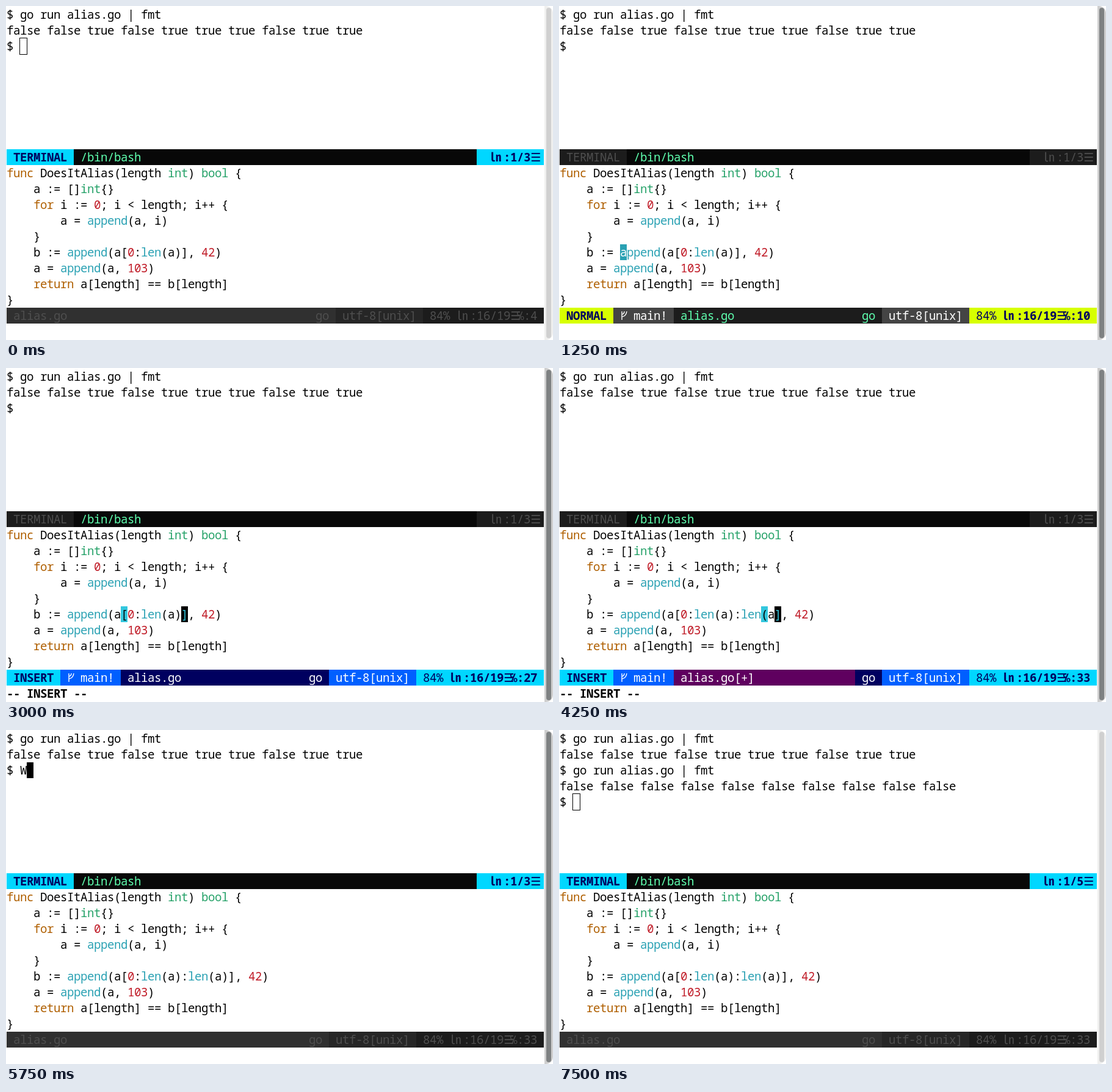
An HTML page with a canvas that plays this animation: 896x548 px, repeating every 7.75 s.

```html
<!DOCTYPE html>
<html lang="en">
<head>
<meta charset="utf-8">
<title>Slice aliasing in Go</title>
<style>
html, body { margin: 0; width: 100%; height: 100%; overflow: hidden; background: #fff; }
canvas { display: block; }
</style>
</head>
<body>
<canvas id="stage" width="896" height="548"></canvas>
<script>
const ctx = document.getElementById('stage').getContext('2d');
const W = 896, H = 548, CELL_W = 11, CELL_H = 26, COLS = 80, STEP = 250, STEPS = 31;
const FONT = '19.1px "Noto Sans Mono", "Noto Sans CJK JP", "DejaVu Sans", monospace';
const NAVY = '#00005f', CYAN = '#00d7ff', MINT = '#5fffaf', MATCH = '#33c7de', DIM = '#4e4e4e';
const SYNTAX = [
  [/^(func|for|return)$/, '#af5f00'],
  [/^(int|bool)$/, '#26a269'],
  [/^(append|len)$/, '#2aa1b3'],
  [/^\d+$/, '#c01c28'],
];
const THEMES = {
  NORMAL: { a: '#d7ff00', b: '#444444', c: '#1c1c1c', text: MINT },
  INSERT: { a: CYAN, b: '#005fff', c: NAVY, text: '#fff' },
};
const RUN = 'go run alias.go | fmt';
const FIRST_OUTPUT = 'false false true false true true true false true true';
const SECOND_OUTPUT = Array(10).fill('false').join(' ');
const EXTRA = ':len(a)';

// Cursor columns (1-based) for each step spent in the editor
const NORMAL_COLS = [4, 5, 8, 10, 16, 18, 19, 21, 24, 26];
const INSERT_COLS = [27, 28, 29, 31, 32, 33, 34, 34];

function stateAt(step) {
  const s = { focused: step > 0 && step < 30, mode: 'TERMINAL', col: 4, extra: '', message: '', shell: ['$ '] };
  if (step >= 2 && step < 12) {
    s.mode = 'NORMAL';
    s.col = NORMAL_COLS[step - 2];
  } else if (step >= 12 && step < 20) {
    s.mode = 'INSERT';
    s.col = INSERT_COLS[step - 12];
    s.extra = EXTRA.slice(0, s.col - 27);
    s.message = '-- INSERT --';
  } else if (step >= 20) {
    s.col = 33;
    s.extra = EXTRA;
    if (step < 23) s.mode = 'NORMAL';
    if (step === 21) s.message = ':w';
    if (step === 22) s.message = '"alias.go" 19L, 305B written';
  }
  s.modified = s.extra !== '' && step < 22;
  if (step === 23) s.shell = ['$ W'];
  if (step >= 25) s.shell = ['$ ' + RUN];
  if (step >= 26) s.shell.push('');
  if (step >= 28) s.shell = ['$ ' + RUN, SECOND_OUTPUT, '$ '];
  return s;
}

const cellX = col => 1 + col * CELL_W;
const cellY = row => 1 + row * CELL_H;

function fill(col, row, cells, color) {
  ctx.fillStyle = color;
  ctx.fillRect(cellX(col), cellY(row), cells * CELL_W, CELL_H);
}

// Writes text on the character grid and returns the next free column
function put(text, col, row, color = '#000', bold = false) {
  ctx.font = (bold ? 'bold ' : '') + FONT;
  ctx.fillStyle = color;
  for (const ch of text) {
    if (ch !== ' ') ctx.fillText(ch, cellX(col), cellY(row) + 20);
    col += ch === '㏑' ? 2 : 1;
  }
  return col;
}

function invert(ch, col, row, fg, bg) {
  fill(col, row, 1, bg);
  put(ch, col, row, fg);
}

const colorOf = token => (SYNTAX.find(([re]) => re.test(token)) || [0, '#000'])[1];

function drawCode(lines) {
  lines.forEach((line, i) => {
    let col = 0;
    for (const token of line.match(/\w+|\W/g)) col = put(token, col, 10 + i, colorOf(token));
  });
}

// Index of the bracket that pairs with the one at the given index, or -1
function findPair(line, at) {
  const open = '[('.includes(line[at]), close = '])'.includes(line[at]);
  if (!open && !close) return -1;
  let depth = 0;
  for (let i = at; i >= 0 && i < line.length; i += open ? 1 : -1) {
    if ('[('.includes(line[i])) depth++;
    if ('])'.includes(line[i])) depth--;
    if (!depth) return i;
  }
  return -1;
}

function drawEditorCursor(s, line) {
  const row = 15, at = s.col - 1, pair = findPair(line, at);
  if (s.message[0] === ':') return fill(s.message.length, 20, 1, '#000');
  if (pair >= 0) {
    invert(line[pair], pair, row, '#000', MATCH);
    invert(line[at], at, row, MATCH, '#000');
  } else if (s.extra && s.mode === 'INSERT' && line[at] === ']') {
    const start = line.indexOf('[');
    invert('[', start, row, '#000', MATCH);
    invert(']', at, row, MATCH, '#000');
  } else {
    const word = [...line.matchAll(/\w+/g)].find(m => at >= m.index && at < m.index + m[0].length);
    invert(line[at], at, row, '#fff', word ? colorOf(word[0]) : '#000');
  }
}

function drawShell(s) {
  const lines = ['$ ' + RUN, FIRST_OUTPUT, ...s.shell], active = s.mode === 'TERMINAL';
  lines.forEach((line, row) => put(line, 0, row));
  const row = lines.length - 1, col = lines[row].length;
  if (active && s.focused) {
    fill(col, row, 1, '#000');
  } else if (active) {
    ctx.strokeStyle = '#000';
    ctx.lineWidth = 1;
    ctx.strokeRect(cellX(col) - 0.5, cellY(row) - 0.5, 12, 27);
  }
  const bg = active ? CYAN : '#1c1c1c', fg = active ? NAVY : DIM;
  fill(0, 9, COLS, '#080808');
  fill(0, 9, 10, bg);
  fill(70, 9, 10, bg);
  put('TERMINAL', 1, 9, fg, active);
  put('/bin/bash', 11, 9, MINT);
  put(`㏑:1/${lines.length}☰`, 72, 9, fg, active);
}

function drawBranch(x, y) {
  ctx.strokeStyle = '#fff';
  ctx.lineWidth = 1.4;
  ctx.beginPath();
  ctx.moveTo(x + 3, y + 6);
  ctx.lineTo(x + 3, y + 20);
  ctx.moveTo(x + 3, y + 15);
  ctx.quadraticCurveTo(x + 10, y + 14, x + 11, y + 6);
  ctx.moveTo(x + 3, y + 11);
  ctx.quadraticCurveTo(x + 7, y + 10, x + 7, y + 6);
  ctx.stroke();
}

function drawStatus(s) {
  const row = 19, theme = THEMES[s.mode], position = `㏑:16/19☰℅:${s.col}`;
  const right = COLS - position.length - 7, middle = right - 13;
  const [a, b, c] = theme ? [theme.a, theme.b, theme.c] : ['#1c1c1c', '#262626', '#303030'];
  const fgA = theme ? NAVY : DIM, fgB = theme ? '#fff' : DIM, fgC = theme ? theme.text : DIM;
  fill(0, row, COLS, c);
  fill(middle, row, 13, b);
  fill(right, row, COLS - right, a);
  if (theme) {
    fill(0, row, 8, a);
    fill(8, row, 9, b);
    put(s.mode, 1, row, NAVY, true);
    drawBranch(cellX(9), cellY(row));
    put('main!', 11, row, '#fff');
    if (s.modified) fill(17, row, middle - 21, '#5f005f');
  }
  put(s.modified ? 'alias.go[+]' : 'alias.go', theme ? 18 : 1, row, s.modified ? '#fff' : fgC);
  put('go', middle - 3, row, fgC);
  put('utf-8[unix]', middle + 1, row, fgB);
  put('84%', right + 1, row, fgA);
  put(position, right + 5, row, fgA, !!theme);
}

function drawScrollbar(focused) {
  ctx.fillStyle = focused ? '#cecece' : '#efefee';
  ctx.fillRect(882, 0, 14, H);
  ctx.fillStyle = focused ? '#7e8182' : '#d0d0d0';
  ctx.beginPath();
  ctx.roundRect(885, 3, 8, H - 6, 4);
  ctx.fill();
}

function draw(step) {
  const s = stateAt(step);
  const code = [
    'func DoesItAlias(length int) bool {',
    '    a := []int{}',
    '    for i := 0; i < length; i++ {',
    '        a = append(a, i)',
    '    }',
    `    b := append(a[0:len(a)${s.extra}], 42)`,
    '    a = append(a, 103)',
    '    return a[length] == b[length]',
    '}',
  ];
  ctx.fillStyle = '#fff';
  ctx.fillRect(0, 0, W, H);
  ctx.save();
  ctx.beginPath();
  ctx.roundRect(0, 0, W, H, 12);
  ctx.clip();
  drawScrollbar(s.focused);
  ctx.restore();
  drawShell(s);
  drawCode(code);
  drawStatus(s);
  put(s.message, 0, 20, '#000', s.mode === 'INSERT');
  if (s.mode !== 'TERMINAL') drawEditorCursor(s, code[5]);
}

function tick() {
  draw(Math.floor(performance.now() / STEP) % STEPS);
  requestAnimationFrame(tick);
}
tick();
</script>
</body>
</html>
```
